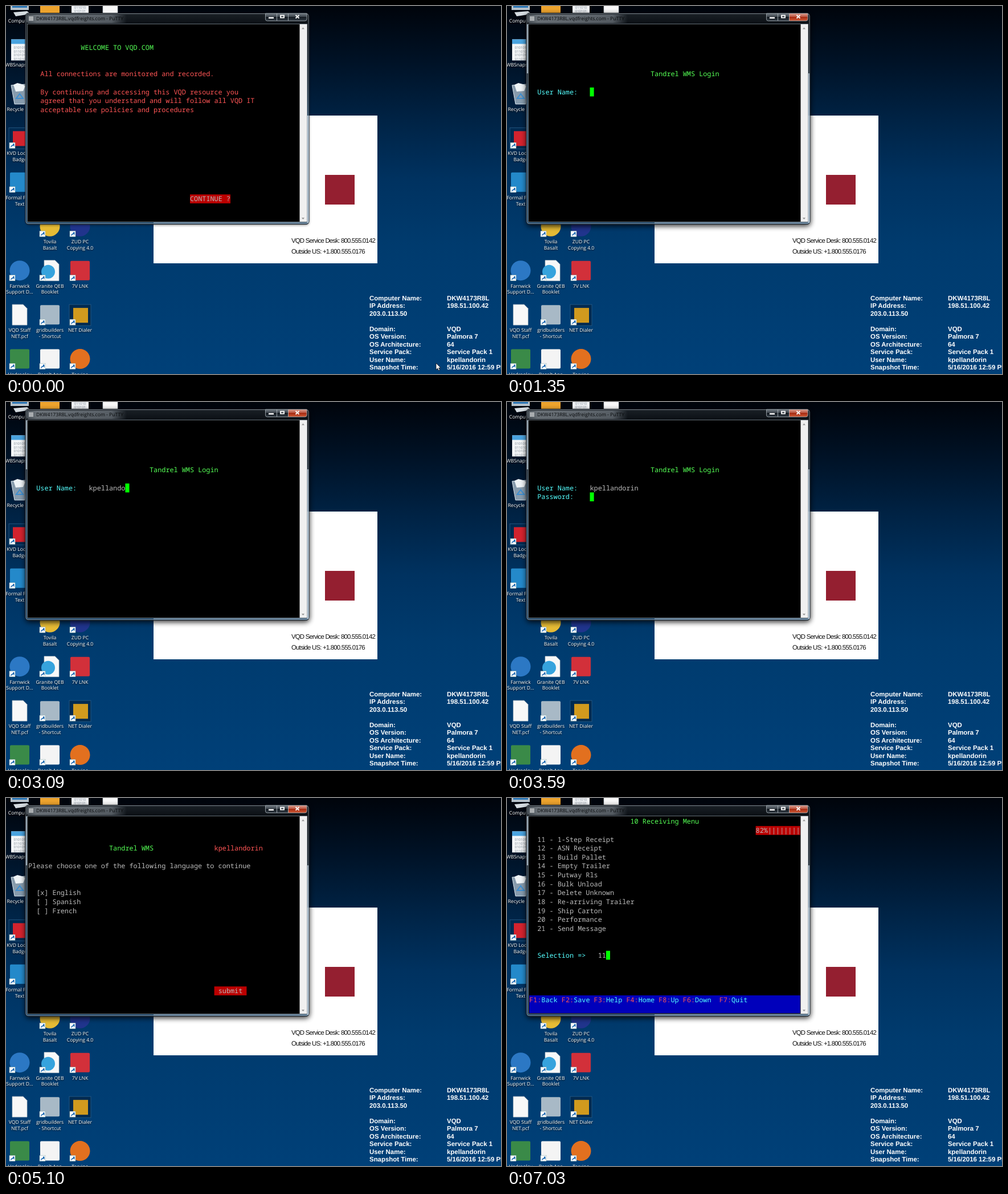
An HTML page for the animation above (8000 ms loop, 869 px wide and 645 px high).

```html
<!DOCTYPE html>
<html lang="en">
<head>
<meta charset="utf-8">
<title>Terminal login</title>
<style>
  html, body { margin: 0; width: 100%; height: 100%; overflow: hidden; background: #003a6b; }
  svg { display: block; width: 869px; height: 645px; }
  text { white-space: pre; text-rendering: geometricPrecision; }
  #term text { font: 500 11.83px "Noto Sans Mono", "DejaVu Sans Mono", monospace; }
  #icons text { font: 8.6px "Open Sans", "Noto Sans", sans-serif; fill: #fff; text-anchor: middle; }
  #icons .label { filter: drop-shadow(0 1px 1px #000); }
  #icons .bits { font-size: 6px; fill: #7c8792; }
  #info text { font: bold 11.45px "Liberation Sans", sans-serif; fill: #fff; }
  #card text { font: 11.4px "Liberation Sans", sans-serif; letter-spacing: -.8px; fill: #111; }
  #title { font: 8.6px "Open Sans", "Noto Sans", sans-serif; fill: #07090b; }
</style>
</head>
<body>
<svg viewBox="0 0 869 645" xmlns="http://www.w3.org/2000/svg">
  <defs>
    <linearGradient id="sky" x1="0" y1="0" x2="0" y2="1">
      <stop offset="0" stop-color="#00040b"/>
      <stop offset=".15" stop-color="#001226"/>
      <stop offset=".31" stop-color="#002345"/>
      <stop offset=".47" stop-color="#003260"/>
      <stop offset=".65" stop-color="#003b6e"/>
      <stop offset="1" stop-color="#004078"/>
    </linearGradient>
    <linearGradient id="glass" x1="0" y1="0" x2="0" y2="1">
      <stop offset="0" stop-color="#1b2127"/>
      <stop offset=".06" stop-color="#080c11"/>
      <stop offset=".3" stop-color="#14212d"/>
      <stop offset=".5" stop-color="#234562"/>
      <stop offset="1" stop-color="#1f4566"/>
    </linearGradient>
    <linearGradient id="glow" x1="0" y1="0" x2="1" y2="0">
      <stop offset="0" stop-color="#8b969f" stop-opacity=".45"/>
      <stop offset=".1" stop-color="#a3abb2" stop-opacity=".6"/>
      <stop offset=".85" stop-color="#98a1a9" stop-opacity=".5"/>
      <stop offset="1" stop-color="#8b969f" stop-opacity="0"/>
    </linearGradient>
    <linearGradient id="button" x1="0" y1="0" x2="0" y2="1">
      <stop offset="0" stop-color="#6d757d"/>
      <stop offset=".45" stop-color="#3f474f"/>
      <stop offset=".5" stop-color="#151b22"/>
      <stop offset="1" stop-color="#2f3841"/>
    </linearGradient>
    <linearGradient id="close" x1="0" y1="0" x2="0" y2="1">
      <stop offset="0" stop-color="#d99a8b"/>
      <stop offset=".45" stop-color="#bf5a45"/>
      <stop offset=".5" stop-color="#a52a12"/>
      <stop offset="1" stop-color="#cf5a35"/>
    </linearGradient>
    <filter id="soft" x="-10%" y="-10%" width="120%" height="120%"><feGaussianBlur stdDeviation="5"/></filter>
    <filter id="tight" x="-10%" y="-10%" width="120%" height="120%"><feGaussianBlur stdDeviation="2"/></filter>
  </defs>

  <rect width="869" height="645" fill="url(#sky)"/>
  <g id="card">
    <rect x="259" y="192" width="393" height="259" fill="#fff"/>
    <rect x="560" y="296" width="52" height="52" fill="#941f30"/>
    <text x="501" y="414.5">VQD Service Desk: 800.555.0142</text>
    <text x="501" y="433.5">Outside US: +1.800.555.0176</text>
  </g>
  <g id="info"></g>
  <g id="icons"></g>

  <g id="window">
    <rect id="shadowIdle" x="35" y="15" width="497" height="369" rx="6" opacity=".5" filter="url(#tight)"/>
    <rect id="shadowActive" x="34" y="15" width="499" height="371" rx="7" opacity=".8" filter="url(#soft)"/>
    <rect x="34" y="12.5" width="498" height="370" rx="5" fill="url(#glass)" stroke="#11171d"/>
    <path d="M530 192V380" stroke="#d3e2ee" stroke-width="3" opacity=".8"/>
    <path d="M259 380H529" stroke="#a9bccb" stroke-width="2" opacity=".5"/>
    <path id="shine" d="M530 118V192M36 118V32" fill="none" stroke="#c5d9ea" stroke-width="2.5" opacity=".7"/>
    <rect x="36" y="15" width="176" height="15" rx="4" fill="url(#glow)"/>
    <rect x="35" y="13.5" width="496" height="368" rx="4" fill="none" stroke="#d3dde5" stroke-opacity=".5"/>
    <rect x="40" y="18" width="8" height="8" fill="#a9adb0"/>
    <text id="title" x="53" y="25">DKW4173R8L.vqdfreights.com - PuTTY</text>
    <g stroke="#aeb6bd" stroke-width=".8">
      <path d="M455.5 13H475.5V26H458.5Q455.5 26 455.5 23Z" fill="url(#button)"/>
      <path d="M475.5 13H495.5V26H475.5Z" fill="url(#button)"/>
      <path id="closeButton" d="M495.5 13H528V23Q528 26 525 26H495.5Z"/>
    </g>
    <rect x="461" y="19.5" width="9" height="2.5" fill="#fff"/>
    <rect x="482" y="16.5" width="6" height="4" fill="none" stroke="#fff" stroke-width="1.8"/>
    <path d="M508.5 16L514.5 21.5M514.5 16L508.5 21.5" stroke="#fff" stroke-width="1.9"/>
    <rect x="37.5" y="31.5" width="491" height="347" fill="#000" stroke="#7d8891" stroke-width=".8"/>
    <rect x="515.5" y="32" width="13" height="346" fill="#f0f0f0"/>
    <path d="M519 40.5L521.5 37.5L524 40.5ZM519 371L521.5 374L524 371Z" fill="#959595"/>
    <g id="term"></g>
  </g>
  <path id="mouse" d="M0 0V11.5L2.7 9L4.5 13L6.5 12.1L4.7 8.2H8.2Z" fill="#fff" stroke="#000" stroke-width=".7"/>
</svg>
<script>
const $ = id => document.getElementById(id);
const LOOP = 8000, CELL = 7.1, ROW = 15.62, LEFT = 39, TOP = 33.5;
const GREEN = '#5f5', RED = '#f55', CYAN = '#5ff', GRAY = '#bbb';
const USER = 'kpellandorin';

// Desktop
const page = (x, y) => `<path d="M${x - 13} ${y - 18}h19l7 7v29h-26z" fill="#f8f8f8" stroke="#b9c0c6" stroke-width=".7"/>`;
const shapes = {
  square: (x, y, c) => `<rect x="${x - 17}" y="${y - 17}" width="34" height="34" rx="2" fill="${c}"/>`,
  small: (x, y, c) => `<rect x="${x - 12}" y="${y - 12}" width="26" height="26" fill="${c}"/>`,
  circle: (x, y, c) => `<circle cx="${x}" cy="${y}" r="17.5" fill="${c}"/>`,
  page,
  pageDot: (x, y, c) => page(x + 3, y) + `<circle cx="${x - 3}" cy="${y + 2}" r="12" fill="${c}"/>`,
  bits: (x, y, c) => `<rect x="${x - 15}" y="${y - 18}" width="30" height="37" fill="#f3f5f7"/>
    <path d="M${x - 15} ${y - 18}h30v8h-30z" fill="${c}"/>` + [0, 1, 2, 3].map(i =>
    `<text class="bits" x="${x}" y="${y - 1 + i * 6.5}">${i % 2 ? '011010' : '010101'}</text>`).join(''),
  bin: (x, y) => `<path d="M${x - 15} ${y - 15}L${x + 13} ${y - 17}L${x + 9} ${y + 18}H${x - 9}Z" fill="#a9bccb" fill-opacity=".8" stroke="#dbe5ed"/>
    <path d="M${x - 11} ${y - 16}l7 -3l8 2l6 3l-4 9l-13 1z" fill="#eef3f6"/>
    <path d="M${x - 6} ${y + 8}l6 -8l6 8z" fill="none" stroke="#3f8fd0" stroke-width="2"/>`,
  computer: (x, y) => `<path d="M${x - 16} ${y - 18}h32v26h-32z" fill="#b5c1ca"/>
    <path d="M${x - 13} ${y - 16}h26v20h-26z" fill="#2f79b7"/><path d="M${x - 11} ${y + 12}l24 -2l6 5l-26 4z" fill="#d5dce1"/>`
};
const shortcut = (x, y) => `<rect x="${x - 18}" y="${y + 8}" width="10" height="10" fill="#fff" stroke="#8aa" stroke-width=".5"/>
  <path d="M${x - 16} ${y + 17}q0 -4 4 -5v-2h-3h5.5v5.5l-1.5 -2q-3 .5 -5 3.5z" fill="#1766b0"/>`;

// column, row, label, shape, colour, shortcut arrow, outline
const ICONS = [
  [0, 0, 'Computer', 'computer'], [1, 0, '', 'square', '#eda32d'],
  [2, 0, '', 'bits', '#e5e9ec'], [3, 0, '', 'page'],
  [0, 1, 'WBSnapshot', 'bits', '#4aa3df'], [0, 2, 'Recycle Bin', 'bin'],
  [0, 3, 'KVD Locker|Badge', 'small', '#d3232e', 1, 1],
  [0, 4, 'Formal Field|Text', 'square', '#2489ca', 1],
  [1, 5, 'Tovila|Basalt', 'circle', '#e6bb35', 1],
  [2, 5, 'ZUD PC|Copying 4.0', 'circle', '#20348c', 1],
  [0, 6, 'Farnwick|Support D...', 'circle', '#2c78c4', 1],
  [1, 6, 'Granite QEB|Booklet', 'pageDot', '#36a3dd', 1],
  [2, 6, '7V LNK', 'square', '#d2303a', 1],
  [0, 7, 'VQD Staff|NET.pcf', 'page'],
  [1, 7, 'gridbuilders|- Shortcut', 'square', '#a8b9c6', 1],
  [2, 7, 'NET Dialer', 'small', '#d19a1e', 1, 1],
  [0, 8, 'Hadronley', 'square', '#3a8a48', 1],
  [1, 8, 'Basalt App', 'square', '#f4f4f4', 1],
  [2, 8, 'Tarvino', 'circle', '#e2701f', 1]
];
$('icons').innerHTML = ICONS.map(([col, row, label, shape, color, arrow, outline]) => {
  const x = 24 + 53 * col, labelY = 26 + 77.45 * row, y = labelY - 27;
  const frame = outline ? `<rect x="${x - 19}" y="${y - 18}" width="38" height="37" fill="#002a50" stroke="#2a5c88" stroke-width=".8"/>` : '';
  const lines = label.split('|').map((s, i) => `<text class="label" x="${x}" y="${labelY + 3 + i * 10.7}">${s}</text>`);
  return frame + shapes[shape](x, y, color) + (arrow ? shortcut(x, y) : '') + lines.join('');
}).join('');

const INFO = [
  ['Computer Name:', 'DKW4173R8L'], ['IP Address:', '198.51.100.42'], ['203.0.113.50', ''], ['', ''],
  ['Domain:', 'VQD'], ['OS Version:', 'Palmora 7'], ['OS Architecture:', '64'],
  ['Service Pack:', 'Service Pack 1'], ['User Name:', USER], ['Snapshot Time:', '5/16/2016 12:59 PM']
];
$('info').innerHTML = INFO.map(([key, value], i) =>
  `<text x="638" y="${515.5 + 13.5 * i}">${key}</text><text x="774" y="${515.5 + 13.5 * i}">${value}</text>`).join('');

// Terminal
const fill = (col, row, cols, color, rows = 1) =>
  `<rect x="${LEFT + col * CELL}" y="${TOP + row * ROW}" width="${cols * CELL}" height="${rows * ROW}" fill="${color}"/>`;
const put = (col, row, text, color = GRAY) =>
  `<text x="${LEFT + col * CELL}" y="${TOP + row * ROW + 11.8}" fill="${color}">${text}</text>`;
const badge = (col, row, text) => fill(col, row, text.length, '#b00') + put(col, row, text);
const input = (col, row, text) => put(col, row, text) + fill(col + text.length, row, 1, '#0f0');

const welcome = () => put(13, 2, 'WELCOME TO VQD.COM', GREEN) + [
  [5, 'All connections are monitored and recorded.'],
  [7, 'By continuing and accessing this VQD resource you'],
  [8, 'agreed that you understand and will follow all VQD IT'],
  [9, 'acceptable use policies and procedures']
].map(([row, s]) => put(3, row, s, RED)).join('') + badge(40, 19, 'CONTINUE ?');

const typed = (steps, t) => steps.reduce((n, [at, count]) => t >= at ? count : n, 0);
const USER_KEYS = [[2050, 1], [2370, 2], [2440, 3], [2510, 4], [2620, 5], [2790, 6], [2900, 8], [3090, 9], [3200, 11], [3380, 12]];
const PASS_KEYS = [[4160, 1], [4220, 3], [4410, 4], [4520, 5], [4620, 7], [4790, 8]];
const MENU_KEYS = [[6980, 1], [7030, 2]];

function login(t) {
  const head = put(30, 5, 'Tandrel WMS Login', GREEN) + put(2, 7, 'User Name:', CYAN);
  if (t < 3590) return head + input(15, 7, USER.slice(0, typed(USER_KEYS, t)));
  return head + put(15, 7, USER) + put(2, 8, 'Password:', CYAN) + input(15, 8, '*'.repeat(typed(PASS_KEYS, t)));
}

const language = () => put(20, 3, 'Tandrel WMS', GREEN) + put(46, 3, USER, RED) +
  put(0, 5, 'Please choose one of the following language to continue') +
  ['[x] English', '[ ] Spanish', '[ ] French'].map((s, i) => put(2, 8 + i, s)).join('') +
  badge(46, 19, ' submit ');

const MENU = ['1-Step Receipt', 'ASN Receipt', 'Build Pallet', 'Empty Trailer', 'Putway Rls', 'Bulk Unload',
  'Delete Unknown', 'Re-arriving Trailer', 'Ship Carton', 'Performance', 'Send Message'];
const KEYS = [[0, 'F1:', 'Back'], [8, 'F2:', 'Save'], [16, 'F3:', 'Help'], [24, 'F4:', 'Home'],
  [32, 'F8:', 'Up'], [38, 'F6:', 'Down'], [47, 'F7:', 'Quit']];
const menu = t => put(25, 0, '10 Receiving Menu', GREEN) + badge(56, 1, '82%||||||||') +
  MENU.map((s, i) => put(2, 2 + i, `${11 + i} - ${s}`)).join('') +
  put(2, 15, 'Selection =&gt;', CYAN) + input(17, 15, '11'.slice(0, typed(MENU_KEYS, t))) +
  fill(0, 20, 67, '#00b', 2) +
  KEYS.map(([col, key, name]) => put(col, 20, key, RED) + put(col + 3, 20, name, CYAN)).join('');

const screen = t => t < 1350 ? welcome() : t < 5100 ? login(t) : t < 6150 ? language() : menu(t);

let shown = '';
function draw(t) {
  const active = t >= 500;
  $('shadowActive').style.display = $('shine').style.display = active ? '' : 'none';
  $('shadowIdle').style.display = active ? 'none' : '';
  $('closeButton').setAttribute('fill', `url(#${active ? 'close' : 'button'})`);

  const [x, y] = t < 30 ? [755, 626] : t < 55 ? [630, 552] : [488.5, 468.5];
  $('mouse').setAttribute('transform', `translate(${x} ${y})`);
  $('mouse').style.display = t < 80 ? '' : 'none';

  const next = screen(t);
  if (next !== shown) $('term').innerHTML = shown = next;
}

const start = performance.now();
function tick() {
  draw((performance.now() - start) % LOOP);
  requestAnimationFrame(tick);
}
tick();
</script>
</body>
</html>
```
